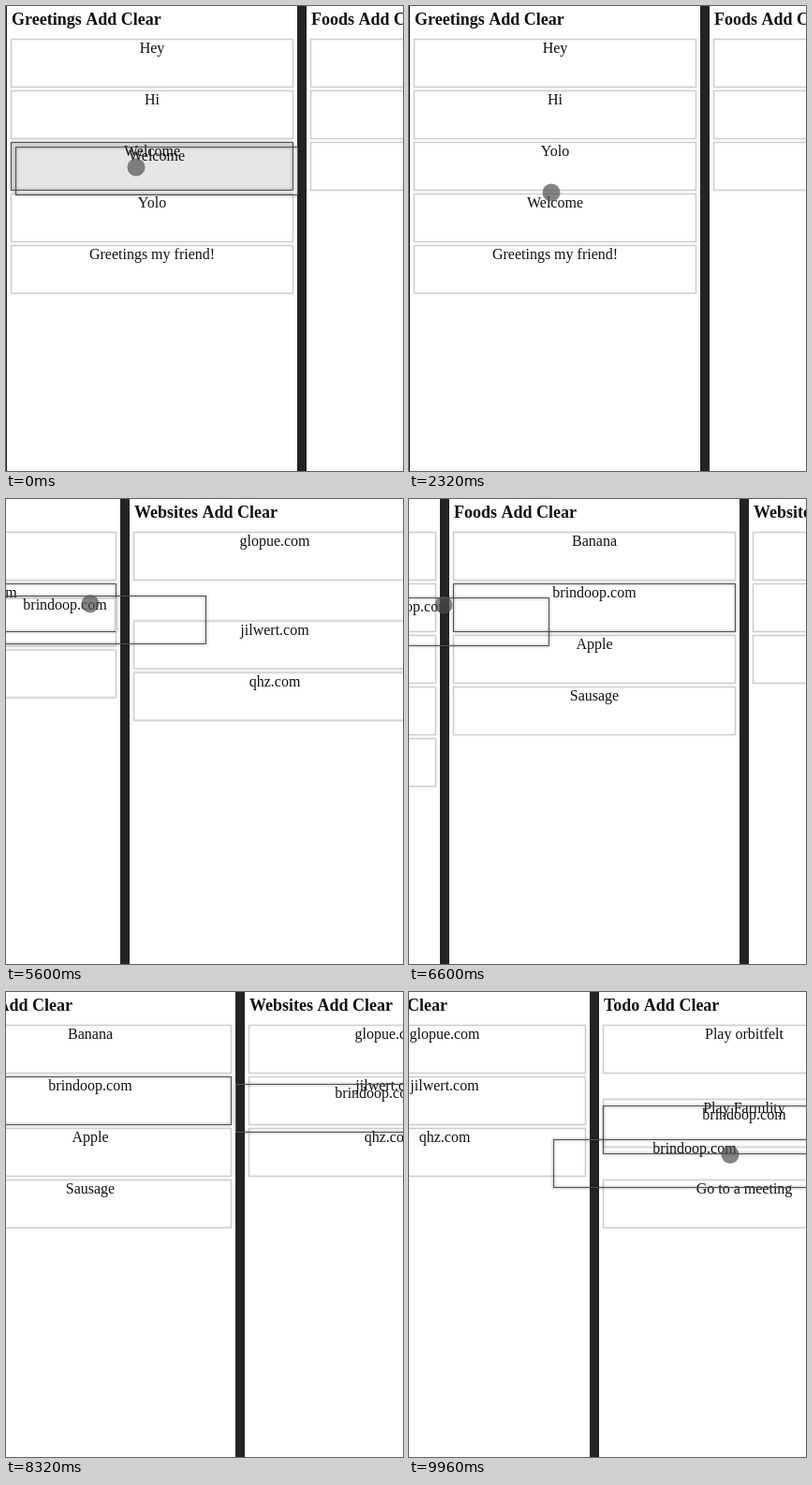
Animation of 424x496 px, one loop 10000 ms. Source, as an HTML page with a canvas:

```html
<!DOCTYPE html>
<html lang="en">
<head>
<meta charset="utf-8">
<title>Drag and drop board</title>
<style>
  html, body { margin: 0; width: 100%; height: 100%; overflow: hidden; background: #fff; }
  canvas { display: block; }
</style>
</head>
<body>
<canvas id="stage" width="424" height="496"></canvas>
<script>
const ctx = document.getElementById('stage').getContext('2d');
const W = 424, H = 496, LOOP = 10000;
const PITCH = 320, COL_W = 310, CARD_W = 302, CARD_H = 52, ROW = 55, TOP = 35;
const FONT = '"Liberation Serif", "Times New Roman", serif';
const SWAP_MS = 200, LAG = 20;

const titles = ['Greetings', 'Foods', 'Websites', 'Todo'];
const board = [
  ['Hey', 'Hi', 'Welcome', 'Yolo', 'Greetings my friend!'],
  ['Banana', 'Apple', 'Sausage'],
  ['glopue.com', 'brindoop.com', 'jilwert.com', 'qhz.com'],
  ['Play orbitfelt', 'Play Farmlity', 'Go to a meeting']
];

// grab offset dx, dy; the card stays pressed grey until its first move
const drags = [
  { item: 'Welcome', from: 0, to: 2300, dx: 129, dy: 22, greyUntil: 170 },
  { item: 'brindoop.com', from: 4910, to: LOOP, dx: 189, dy: 8, greyUntil: 5545 }
];

// time, item, column, row
const moves = [
  [170, 'Welcome', 0, 1],
  [270, 'Welcome', 0, 0],
  [1340, 'Welcome', 0, 1],
  [1660, 'Welcome', 0, 2],
  [2070, 'Welcome', 0, 3],
  [5545, 'brindoop.com', 1, 1],
  [9600, 'brindoop.com', 3, 1],
  [9848, 'brindoop.com', 3, 2]
];

// time, x, y
const pointerKeys = [
  [0, 139, 172], [40, 139, 172], [420, 163, 34], [760, 150, 60], [1000, 150, 60],
  [2000, 150, 170], [2120, 152, 206], [2290, 152, 199], [2330, 152, 199],
  [2720, 290, 124], [2920, 290, 124], [3560, 33, 100], [4420, 33, 100],
  [4600, 330, 106], [5120, 330, 106], [5780, 37, 113], [7000, 37, 113],
  [7460, 434, 106], [9560, 434, 106], [9740, 345, 106], [10100, 342, 207]
];

// time, offset
const flingKeys = [[2920, 0], [4200, 509]];
const edgeKeys = [[5830, 509], [6600, 278], [7060, 140], [7500, 140], [9560, 758]];

const smooth = s => s * s * (3 - 2 * s);
const linear = s => s;

function sample(keys, t, ease) {
  if (t <= keys[0][0]) return keys[0].slice(1);
  for (let i = 1; i < keys.length; i++) {
    const a = keys[i - 1], b = keys[i];
    if (t < b[0]) {
      const k = ease((t - a[0]) / (b[0] - a[0]));
      return a.slice(1).map((v, j) => v + (b[j + 1] - v) * k);
    }
  }
  return keys[keys.length - 1].slice(1);
}

function place(columns) {
  const spots = {};
  columns.forEach((items, col) => items.forEach((item, row) => { spots[item] = { col, row }; }));
  return spots;
}

const layouts = [{ at: -LOOP, spots: place(board) }];
let columns = board;
for (const [at, item, col, row] of moves) {
  columns = columns.map(items => items.filter(other => other !== item));
  columns[col].splice(row, 0, item);
  layouts.push({ at, spots: place(columns) });
}

function drawCard(label, x, y, held, grey) {
  if (grey) {
    ctx.fillStyle = '#e6e6e6';
    ctx.fillRect(x, y, CARD_W, CARD_H);
  }
  ctx.save();
  ctx.shadowColor = held ? 'rgba(0,0,0,0.6)' : 'rgba(0,0,0,0.25)';
  ctx.shadowBlur = held ? 3 : 2;
  ctx.strokeStyle = held ? '#555' : '#ccc';
  ctx.lineWidth = 1;
  ctx.strokeRect(x + 0.5, y + 0.5, CARD_W - 1, CARD_H - 1);
  ctx.restore();
  ctx.fillStyle = '#111';
  ctx.font = '16px ' + FONT;
  ctx.textAlign = 'center';
  ctx.fillText(label, x + CARD_W / 2, y + 15);
}

function drawColumns(scroll) {
  ctx.fillStyle = '#222423';
  ctx.fillRect(0, 0, W, H);
  ctx.font = 'bold 18px ' + FONT;
  ctx.textAlign = 'left';
  titles.forEach((title, i) => {
    const x = 1 + PITCH * i - scroll;
    ctx.fillStyle = '#fff';
    ctx.fillRect(x, 0, COL_W, H);
    ctx.fillStyle = '#111';
    ctx.fillText(title + ' Add Clear', x + 5, 20);
  });
}

function drawCards(t, scroll, drag) {
  let n = layouts.length - 1;
  while (layouts[n].at > t) n--;
  const now = layouts[n], before = layouts[Math.max(0, n - 1)];
  const k = Math.min(1, (t - now.at) / SWAP_MS);
  for (const item in now.spots) {
    const { col, row } = now.spots[item], old = before.spots[item];
    const r = old.col === col ? old.row + (row - old.row) * k : row;
    const held = Boolean(drag) && drag.item === item;
    drawCard(item, 5 + PITCH * col - scroll, TOP + ROW * r, held, held && t < drag.greyUntil);
  }
}

function draw(t) {
  const scroll = Math.round(t < 5000 ? sample(flingKeys, t, smooth)[0] : sample(edgeKeys, t, linear)[0]);
  const drag = drags.find(d => t >= d.from && t < d.to);
  drawColumns(scroll);
  drawCards(t, scroll, drag);
  if (drag) {
    const [x, y] = sample(pointerKeys, t - LAG, smooth);
    drawCard(drag.item, Math.round(x - drag.dx), Math.round(y - drag.dy), true, false);
  }
  const [px, py] = sample(pointerKeys, t, smooth);
  ctx.fillStyle = 'rgba(80,80,80,0.7)';
  ctx.beginPath();
  ctx.arc(px, py, 9.5, 0, Math.PI * 2);
  ctx.fill();
}

const start = performance.now();
function frame() {
  draw((performance.now() - start) % LOOP);
  requestAnimationFrame(frame);
}
frame();
</script>
</body>
</html>
```
